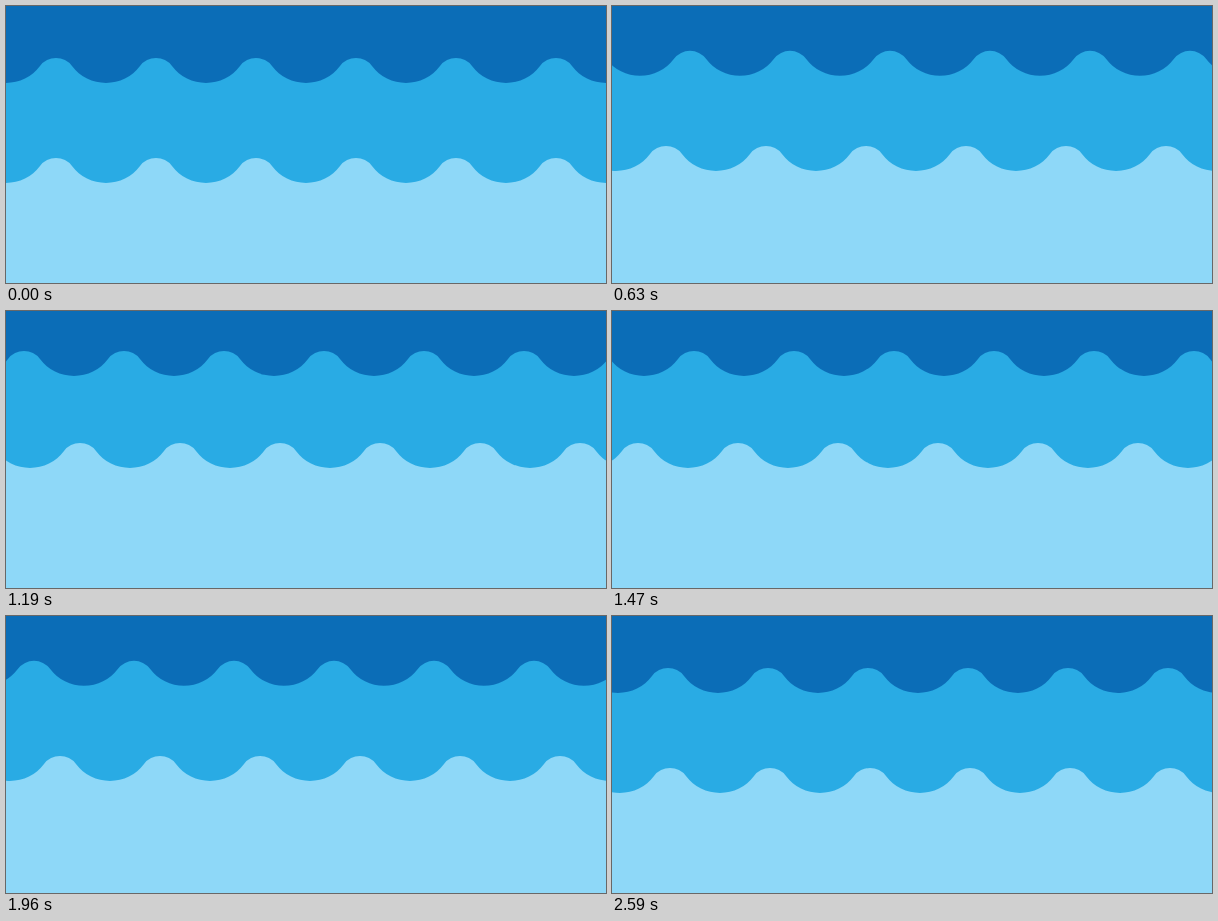
Recreate the animation shown at these times as an HTML page. Size 600x277 px, loop 2.62 s.

```html
<!DOCTYPE html>
<html lang="en">
<head>
<meta charset="utf-8">
<title>Waves</title>
<style>
  html, body { margin: 0; width: 100%; height: 100%; overflow: hidden; background: #0b6db7; }
  svg { display: block; width: 600px; height: 277px; }
</style>
</head>
<body>
<svg viewBox="0 0 600 277">
  <path id="back" fill="#29abe4"/>
  <path id="front" fill="#8ed8f8"/>
</svg>
<script>
const LOOP = 2620, STEP = 70;

// drift: px to the left per tick; rise: total lift
const waves = [
  { el: document.getElementById('back'), y: 52, drift: 6, rise: 12 },
  { el: document.getElementById('front'), y: 152, drift: 8, rise: 20 }
];

// One period is a wide trough arc joined smoothly to a narrow crest arc.
const period = 'a42.5 42.5 0 0 0 68 0a20 20 0 0 1 32 0';
const shape = 'M-34 8' + period.repeat(8) + 'V300H-34Z';
for (const w of waves) w.el.setAttribute('d', shape);

const clamp = v => Math.min(1, Math.max(0, v));

// Rises over 20 ticks, holds, then sinks back from tick 29 to 49.
const lift = tick => Math.min(clamp(tick / 20), clamp((49 - tick) / 20));

function draw(ms) {
  // 50 ticks per loop, every fourth one skipped
  const tick = Math.floor(Math.floor((ms % LOOP) / STEP) * 4 / 3);
  for (const w of waves) {
    const x = -(w.drift * tick % 100);
    const y = w.y - w.rise * lift(tick);
    w.el.setAttribute('transform', `translate(${x} ${y})`);
  }
}

const start = performance.now();
function loop() {
  draw(performance.now() - start);
  requestAnimationFrame(loop);
}
loop();
</script>
</body>
</html>
```
